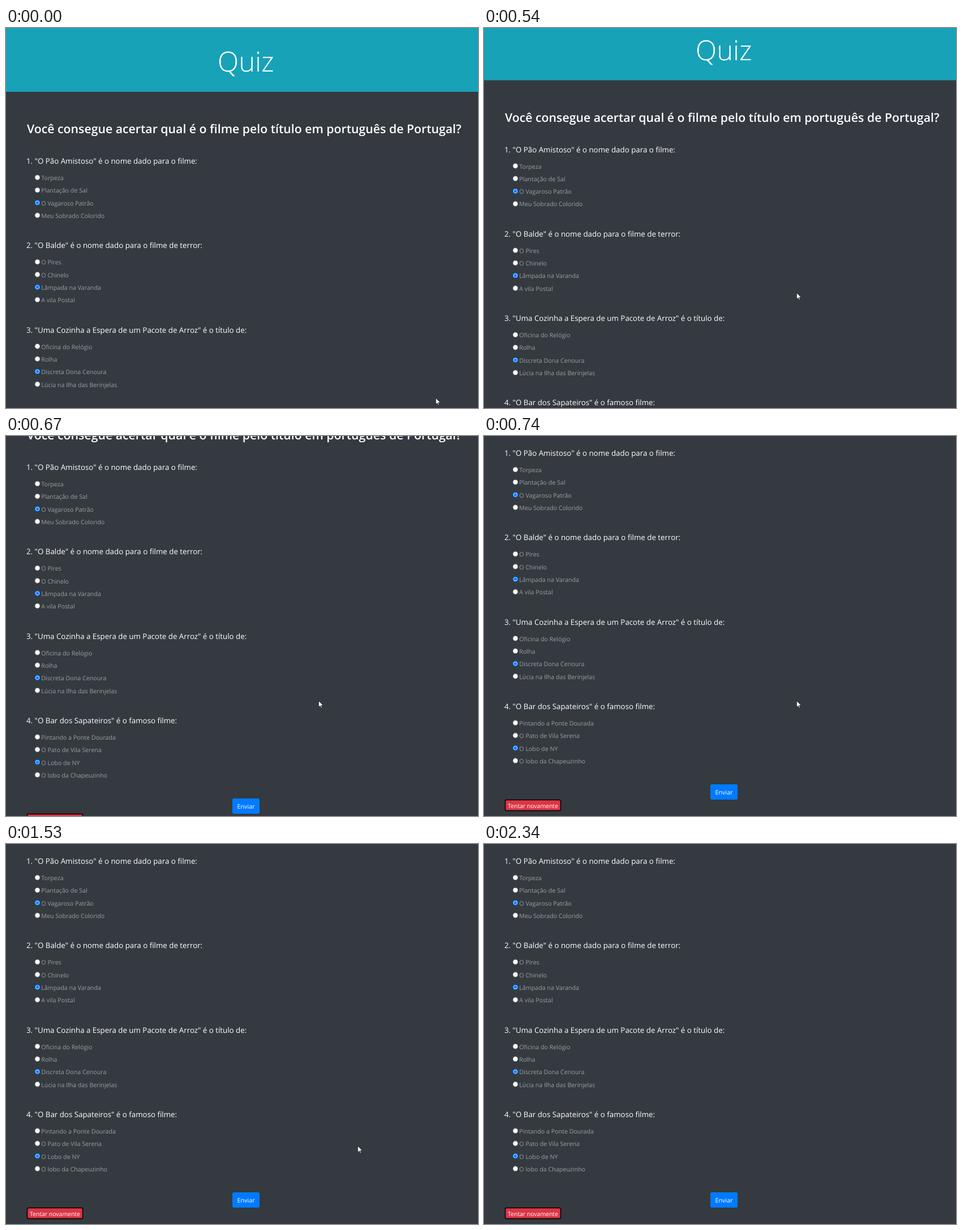
Animation of 834x672 px, one loop 2740 ms. Source, as an HTML page:

```html
<!DOCTYPE html>
<html lang="pt-BR">
<head>
<meta charset="utf-8">
<title>Quiz</title>
<style>
  html, body { margin: 0; width: 100%; height: 100%; overflow: hidden; background: #343a40; }
  svg { display: block; }
  text { font-family: "Open Sans", "Noto Sans", sans-serif; fill: #fff; white-space: pre; text-rendering: geometricPrecision; }
  .title { font-size: 49px; font-weight: 300; text-anchor: middle; }
  .heading { font-size: 21.26px; font-weight: 600; }
  .question { font-size: 13.32px; }
  .option { font-size: 10.68px; fill: #9c9fa2; }
  .button { font-size: 10.45px; text-anchor: middle; }
  .radio { fill: #fff; stroke: #767676; stroke-width: .8; }
  .checked { stroke: #0075ff; stroke-width: 1.4; }
  .dot { fill: #0075ff; }
</style>
</head>
<body>
<svg width="834" height="672" viewBox="0 0 834 672">
  <g id="page">
    <rect width="834" height="112.8" fill="#17a2b8"/>
    <text class="title" x="423.7" y="77">Quiz</text>
    <text class="heading" x="37" y="186">Você consegue acertar qual é o filme pelo título em português de Portugal?</text>
    <g id="quiz"></g>
    <rect x="400" y="821" width="48" height="27" rx="3" fill="#007bff"/>
    <text class="button" x="424" y="839" style="font-size:10.8px">Enviar</text>
    <rect x="37.5" y="848.5" width="98" height="19" rx="2.5" fill="#dc3545" stroke="#000" stroke-width="1.5"/>
    <text class="button" x="86.5" y="862.5">Tentar novamente</text>
  </g>
  <path id="cursor" d="M0 0V11L2.6 8.6 4.4 12.6 6 11.9 4.3 8H8Z" fill="#fff" stroke="#000" stroke-width=".6"/>
</svg>
<script>
const DURATION = 2740;
const page = document.getElementById('page');
const cursor = document.getElementById('cursor');

// Each entry: question, then its four options.
const questions = [
  ['"O Pão Amistoso" é o nome dado para o filme:',
    'Torpeza', 'Plantação de Sal', 'O Vagaroso Patrão', 'Meu Sobrado Colorido'],
  ['"O Balde" é o nome dado para o filme de terror:',
    'O Pires', 'O Chinelo', 'Lâmpada na Varanda', 'A vila Postal'],
  ['"Uma Cozinha a Espera de um Pacote de Arroz" é o título de:',
    'Oficina do Relógio', 'Rolha', 'Discreta Dona Cenoura', 'Lúcia na Ilha das Berinjelas'],
  ['"O Bar dos Sapateiros" é o famoso filme:',
    'Pintando a Ponte Dourada', 'O Pato de Vila Serena', 'O Lobo de NY', 'O lobo da Chapeuzinho']
];
const SELECTED = 2;

function radio(y, checked) {
  return checked
    ? `<circle class="radio checked" cx="55.5" cy="${y}" r="4"/><circle class="dot" cx="55.5" cy="${y}" r="2.6"/>`
    : `<circle class="radio" cx="55.5" cy="${y}" r="4.4"/>`;
}

document.getElementById('quiz').innerHTML = questions.map(([question, ...options], i) => {
  const top = 240 + i * 149.3;
  return `<text class="question" x="36" y="${top}">${i + 1}. ${question}</text>` +
    options.map((label, j) => {
      const y = top + 29 + j * 22.3;
      return radio(y - 4.7, j === SELECTED) + `<text class="option" x="62.3" y="${y}">${label}</text>`;
    }).join('');
}).join('');

const smooth = p => p * p * (3 - 2 * p);

// Each move shows eight positions, from the first at `start` to the last at `end`.
const moves = [
  { start: 70, end: 540, from: [759.5, 654.5], to: [552.5, 468.5], ease: k => smooth((k + 1) / 8) },
  { start: 1250, end: 1740, from: [552.5, 471], to: [673.5, 581.5], ease: k => k / 7 },
  { start: 1800, end: 2280, from: [687.5, 593.5], to: [791, 671], ease: k => k / 7 }
];

function cursorAt(t) {
  if (t >= 2340) return [900, 700];
  const move = moves.findLast(m => t >= m.start);
  if (!move) return moves[0].from;
  const k = Math.min(7, Math.floor((t - move.start) / (move.end - move.start) * 7 + 1e-6));
  const p = move.ease(k);
  return move.from.map((a, i) => a + (move.to[i] - a) * p);
}

const scrollSteps = [[0, 0], [540, 20.4], [610, 102], [670, 180], [740, 205]];
const scrollAt = t => scrollSteps.findLast(([start]) => t >= start)[1];

function draw() {
  const t = performance.now() % DURATION;
  page.setAttribute('transform', `translate(0 ${-scrollAt(t)})`);
  cursor.setAttribute('transform', `translate(${cursorAt(t)})`);
  requestAnimationFrame(draw);
}
draw();
</script>
</body>
</html>
```
